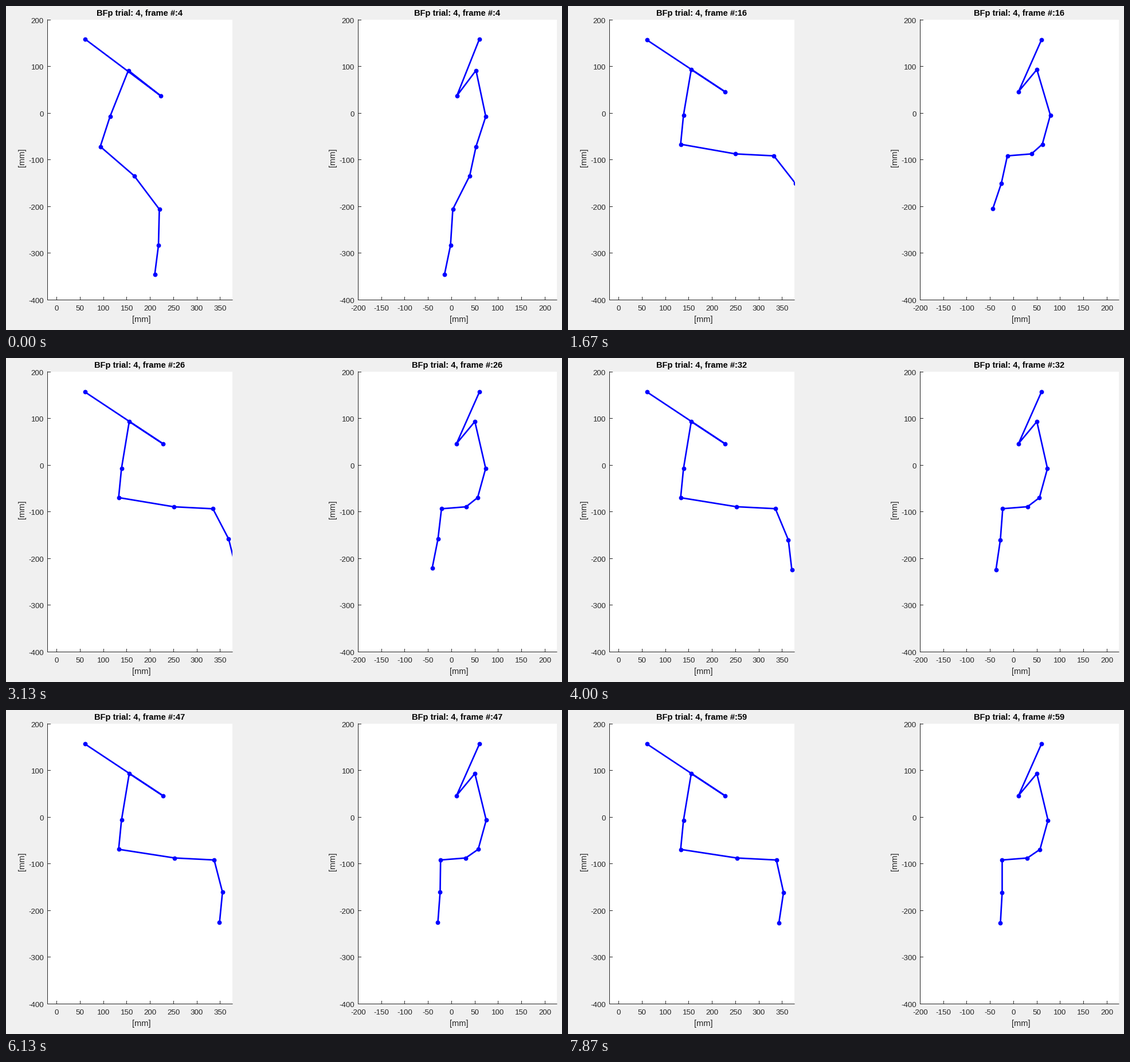
These frames come from a looping animation (970 by 566 pixels, 8000 ms). A matplotlib script:

```python
import numpy as np
import matplotlib.pyplot as plt
from matplotlib.animation import FuncAnimation
from matplotlib.patches import Rectangle

W, H, DPI = 970, 566, 64
LOOP, STEP = 8000, 25
PT = 72 / DPI                      # points per pixel
SCALE = 0.8145                     # pixels per millimetre
TOP, BOTTOM = 24, 513
INK, BLUE = "#262626", "#0000ff"

plt.rcParams["font.family"] = "Liberation Sans"
fig = plt.figure(figsize=(W / DPI, H / DPI), dpi=DPI, facecolor="#f0f0f0")
ax = fig.add_axes([0, 0, 1, 1])
ax.set_xlim(0, W)
ax.set_ylim(H, 0)
ax.axis("off")


def label(x, y, text, px=40 / 3, **kw):
    kw = {"ha": "center", "va": "baseline", "color": INK, **kw}
    return ax.text(x, y, text, fontsize=px * PT, **kw)


def panel(left, right, low, ticks):
    """Draw one set of axes; return its limb line and title."""
    box = Rectangle((left, TOP), right - left, BOTTOM - TOP, fc="white", lw=0)
    ax.add_patch(box)
    x0, y0 = left + 0.5, BOTTOM + 0.5
    xs, ys = [x0, x0, right], [TOP, y0, y0]
    for v in ticks:
        x = x0 + (v - low) * SCALE
        xs += [np.nan] + [np.floor(x) + 0.5] * 2
        ys += [np.nan, y0, y0 - 5]
        label(x - 0.3, 532, str(v))
    for v in range(-400, 201, 100):
        y = TOP + 0.5 + (200 - v) * SCALE
        xs += [np.nan, x0, x0 + 5]
        ys += [np.nan] + [np.floor(y) + 0.5] * 2
        label(left - 6, y + 5.5, str(v), ha="right")
    ax.plot(xs, ys, color=INK, lw=PT, snap=False, solid_capstyle="projecting")

    mid = (left + right) / 2
    label(mid + 2.5, 552, "[mm]", 44 / 3)
    label(left - 40, 265, "[mm]", 44 / 3, rotation=90, rotation_mode="anchor")
    title = label(mid, 17, "", 44 / 3, weight="bold", color="black")
    limb, = ax.plot([], [], "o-", color=BLUE, lw=2.67 * PT, ms=7.8 * PT,
                    mew=0, snap=False)
    limb.set_clip_path(box)
    return limb, title


side, side_title = panel(72, 395, -20, range(0, 351, 50))
front, front_title = panel(614, 961, -200, range(-200, 201, 50))

# Leg from pelvis to toe (side x, front x, height), hanging and flexed
HANGING = [(137.5, 826, 57.5), (270, 786.5, 157), (213.5, 820, 112.5),
           (181.5, 837, 193), (164.5, 820, 245.5), (223.5, 809, 296.5),
           (267.5, 779.5, 355), (266, 775.5, 418), (259.5, 765, 469)]
FLEXED = [(137.5, 826, 59.2), (273.5, 786, 149.5), (215, 818, 111),
          (201.5, 837.5, 192.5), (196.5, 823.5, 243.5), (294.5, 801.5, 258.5),
          (363.5, 757.5, 262), (376, 757.5, 318.5), (368, 754.5, 371.5)]

# Lag of the last four bones: length, angle, sideways offset
LAG = np.zeros((8, 3))
LAG[4:] = [(-2, 1.3, 3), (-2, 0, 2), (3, -25.5, -10.5), (-2, -38.6, -12)]
LAG[:, 1] = np.radians(LAG[:, 1])


def bones(joints):
    """Length and angle in the side view, plus sideways offset, per bone."""
    x, f, y = np.diff(joints, axis=0).T
    return np.column_stack([np.hypot(x, y), np.arctan2(y, x), f])


START, END = bones(HANGING), bones(FLEXED)
HIPS = np.array([HANGING[0], FLEXED[0]])


def pose(n):
    """Kick from sample 4 to 16, then the foot swings slowly home."""
    s = np.clip((n - 4) / 12, 0, 1) ** 1.85
    kick = s * s * (3 - 2 * s)
    after = max(n - 16, 0)
    lag = kick ** 2 * (1 - after / 43) ** 2
    bounce = kick ** 2 * np.exp(-after / 12) * np.cos(np.pi * after / 16)

    # the pelvis and thigh start later than the shank
    u = np.where(np.arange(8) < 4, kick ** 2, kick)[:, None]
    length, angle, shift = (START + (END - START) * u + LAG * lag).T
    step = np.column_stack([length * np.cos(angle), shift,
                            length * np.sin(angle)])
    step[2] += bounce * np.array([0, 4, -2])
    hip = HIPS[0] + (HIPS[1] - HIPS[0]) * kick
    return np.vstack([hip, hip + np.cumsum(step, axis=0)])


def update(k):
    tick = (k * STEP + 20) * 15 // 1000          # screen refreshes at 15 Hz
    n = 4 + int((tick + 1.15) / 2.1455)          # samples arrive at 7 Hz
    x, f, y = pose(n).T
    side.set_data(x, y)
    front.set_data(f, y)
    for title in (side_title, front_title):
        title.set_text(f"BFp trial: 4, frame #:{n}")
    return side, front, side_title, front_title


anim = FuncAnimation(fig, update, frames=LOOP // STEP, interval=STEP,
                     repeat=True, repeat_delay=0)
plt.show()
```
